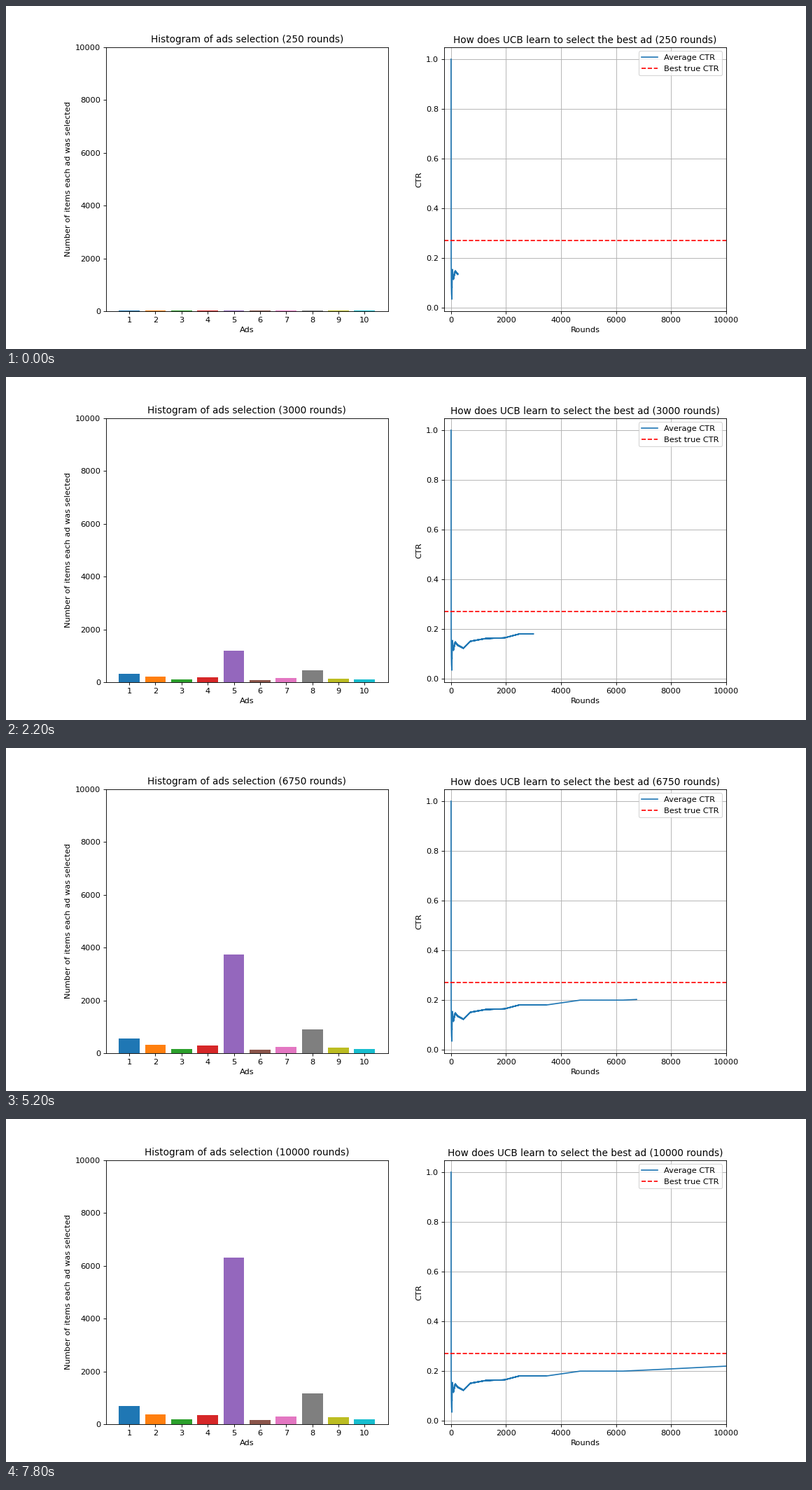
Animation, 1143 px wide and 490 px high, one loop 8000 ms. Source, as a matplotlib script:

```python
import numpy as np
import matplotlib.pyplot as plt
from matplotlib.animation import FuncAnimation

FRAMES, STEP = 40, 250
ROUNDS = FRAMES * STEP
ADS = np.arange(1, 11)

# True click-through rate of each ad
RATES = np.array([.176, .127, .044, .116, .2695, .013, .099, .2075, .084, .044])

# Key points of the average click-through rate
KEY_ROUNDS = [28, 50, 85, 150, 250, 450, 700, 1250,
              1950, 2500, 3500, 4700, 6250, 8000, ROUNDS]
KEY_RATES = [.036, .148, .115, .146, .134, .122, .150, .161,
             .164, .180, .180, .199, .199, .208, .219]


def run_ucb():
    """Selection counts after every STEP rounds of the UCB rule."""
    counts = np.zeros(len(ADS))
    history = []
    for n in range(1, ROUNDS + 1):
        if n <= len(ADS):
            pick = n - 1
        else:
            pick = np.argmax(RATES + np.sqrt(1.5 * np.log(n) / counts))
        counts[pick] += 1
        if n % STEP == 0:
            history.append(counts.copy())
    return history


def average_ctr():
    """Whole clicks following the key points, divided by rounds played."""
    n = np.arange(1, ROUNDS + 1)
    clicks = np.round(n * np.interp(n, KEY_ROUNDS, KEY_RATES))
    clicks[:KEY_ROUNDS[0]] = 1
    return np.maximum.accumulate(clicks) / n


history = run_ucb()
ctr = average_ctr()
x = np.arange(ROUNDS)

plt.rcParams["font.size"] = 10.2
fig, (hist, curve) = plt.subplots(1, 2, figsize=(14.2875, 6.125), dpi=80)

bars = hist.bar(ADS, history[0], color=[f"C{i}" for i in range(10)])
hist.set_xticks(ADS)
hist.set_ylim(0, ROUNDS)
hist.set_xlabel("Ads")
hist.set_ylabel("Number of items each ad was selected")

line, = curve.plot([], [], label="Average CTR")
curve.axhline(RATES.max(), color="red", linestyle="--", label="Best true CTR")
curve.set_xlim(-STEP, ROUNDS)
low = ctr.min()
pad = 0.05 * (1 - low)
curve.set_ylim(low - pad, 1 + pad)
curve.set_xlabel("Rounds")
curve.set_ylabel("CTR")
curve.grid()
curve.legend(loc="upper right")


def update(frame):
    rounds = (frame + 1) * STEP
    for bar, count in zip(bars, history[frame]):
        bar.set_height(count)
    line.set_data(x[:rounds], ctr[:rounds])
    hist.set_title(f"Histogram of ads selection ({rounds} rounds)")
    curve.set_title(
        f"How does UCB learn to select the best ad ({rounds} rounds)")
    return [*bars, line]


anim = FuncAnimation(fig, update, frames=FRAMES, interval=200,
                     repeat=True, repeat_delay=0, blit=False)
plt.show()
```
